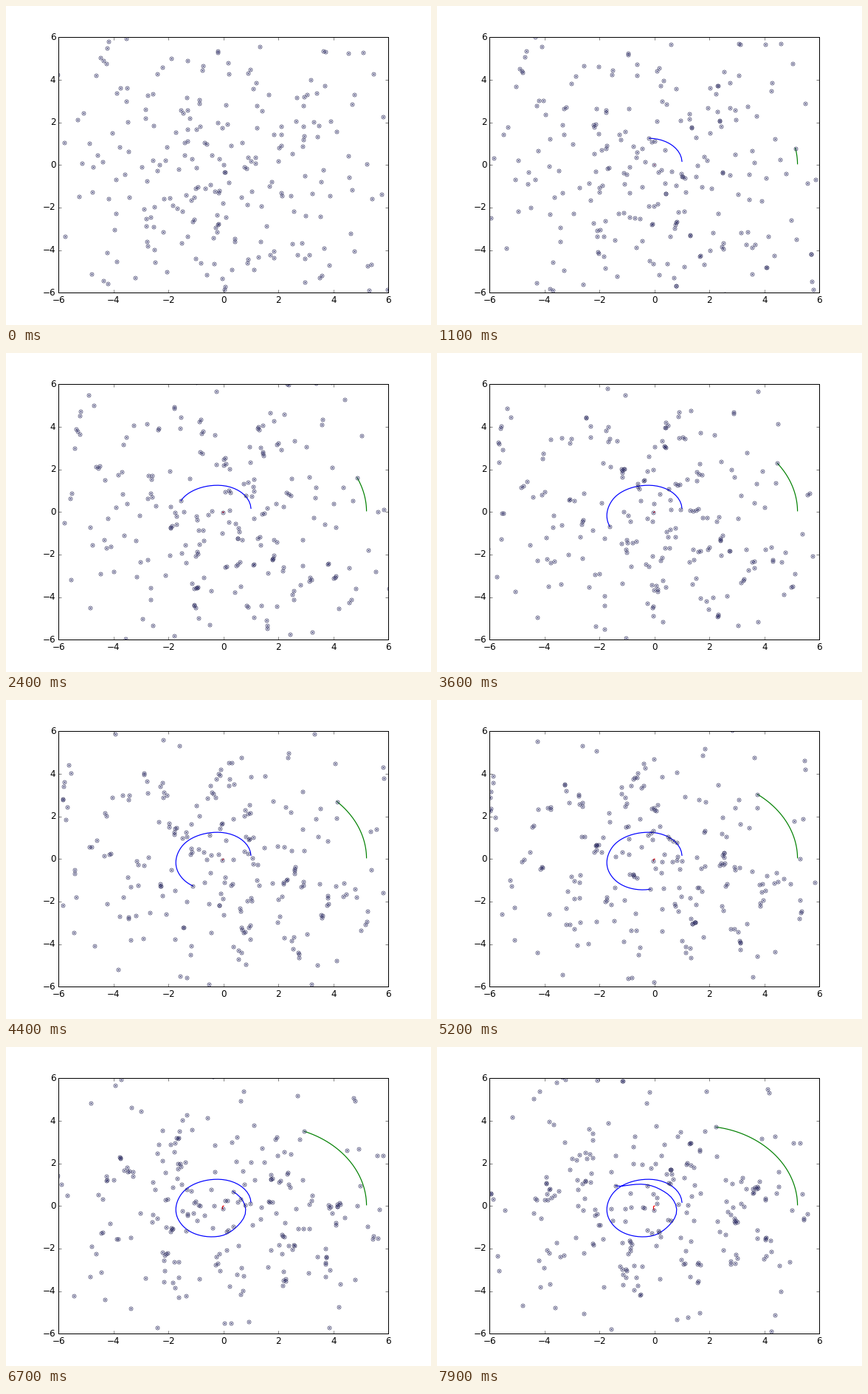
Animation of 576x432 px, one loop 8 s. Source, as a matplotlib script:

```python
import numpy as np
import matplotlib.pyplot as plt
from matplotlib.animation import FuncAnimation

plt.style.use("classic")
plt.rcParams.update({"font.family": "DejaVu Sans", "savefig.dpi": "figure"})

W, H = 576, 432
STEPS = 80
LIMIT = 6
GM = (2 * np.pi * 0.025) ** 2   # solar gravity, AU and steps of 0.025 year
ROCKS = 300
ROCK_MASS = 0.0013              # in solar masses
SPREAD = 4

step = np.arange(STEPS)


def polar(angle, r):
    a = np.radians(angle)
    return np.column_stack([r * np.cos(a), r * np.sin(a)])


def spline(t, p):
    """Hermite curve through timed key values, sampled at every step."""
    t, p = np.array(t, float), np.array(p, float)
    slope = np.gradient(p, t, edge_order=2)
    i = np.clip(np.searchsorted(t, step, side="right") - 1, 0, len(t) - 2)
    h = t[i + 1] - t[i]
    u = (step - t[i]) / h
    return ((1 + 2 * u) * (1 - u) ** 2 * p[i] + u * (1 - u) ** 2 * h * slope[i]
            + u * u * (3 - 2 * u) * p[i + 1] + u * u * (u - 1) * h * slope[i + 1])


def sun_path():
    return np.column_stack([-0.04 * np.sin(np.pi * step / 90),
                            -0.2 * (step / 79) ** 2])


def inner_path():
    keys = [0, 11, 24, 36, 52, 60, 64, 67, 72, 79]
    angle = spline(keys, [9.6, 99, 161, 203, 263.6, 321, 380, 423, 476, 506])
    r = spline(keys, [1.01, 1.27, 1.64, 1.765, 1.43, 0.93, 0.74, 0.76, 1.14, 1.71])
    return polar(angle, r)


def giant_path():
    return polar(0.57 + 0.74 * step, 5.2 - 1.4e-4 * step ** 2)


def pull(delta, soft):
    d2 = (delta ** 2).sum(axis=-1, keepdims=True) + soft ** 2
    return GM * delta / d2 ** 1.5


def rock_paths(sun):
    """Rocks start on circular orbits and attract each other."""
    rng = np.random.default_rng(5)
    pos = rng.normal(0, SPREAD, (ROCKS, 2))
    r2 = (pos ** 2).sum(axis=1, keepdims=True) + 0.2 ** 2
    vel = np.sqrt(GM) / r2 ** 0.75 * np.column_stack([-pos[:, 1], pos[:, 0]])
    out = []
    for centre in sun:
        out.append(pos)
        mutual = pull(pos[None] - pos[:, None], 0.08).sum(axis=1)
        vel = vel + pull(centre - pos, 0.2) + ROCK_MASS * mutual
        pos = pos + vel
    return np.array(out)


paths = [sun_path(), inner_path(), giant_path()]
bodies = np.concatenate([rock_paths(paths[0]), np.stack(paths, axis=1)], axis=1)

fig = plt.figure(figsize=(W / 72, H / 72), dpi=72, facecolor="white")
ax = fig.add_axes([71.4 / W, 43.8 / H, 447 / W, 345.8 / H])
ax.set_xlim(-LIMIT, LIMIT)
ax.set_ylim(-LIMIT, LIMIT)

trails = [ax.plot([], [], color=c, lw=1.2)[0] for c in "rbg"]
rings, = ax.plot([], [], "o", ms=5, mfc="none", mec=(0.18, 0.18, 0.36), mew=0.65)
dots, = ax.plot([], [], "o", ms=2, mfc=(0.15, 0.15, 0.4), mec="none")


def draw(n):
    for line, path in zip(trails, paths):
        line.set_data(*path[:n + 1].T)
    for marks in (rings, dots):
        marks.set_data(*bodies[n].T)
    return [*trails, rings, dots]


anim = FuncAnimation(fig, draw, frames=STEPS, interval=100, repeat=True,
                     repeat_delay=0, blit=False)
plt.show()
```
